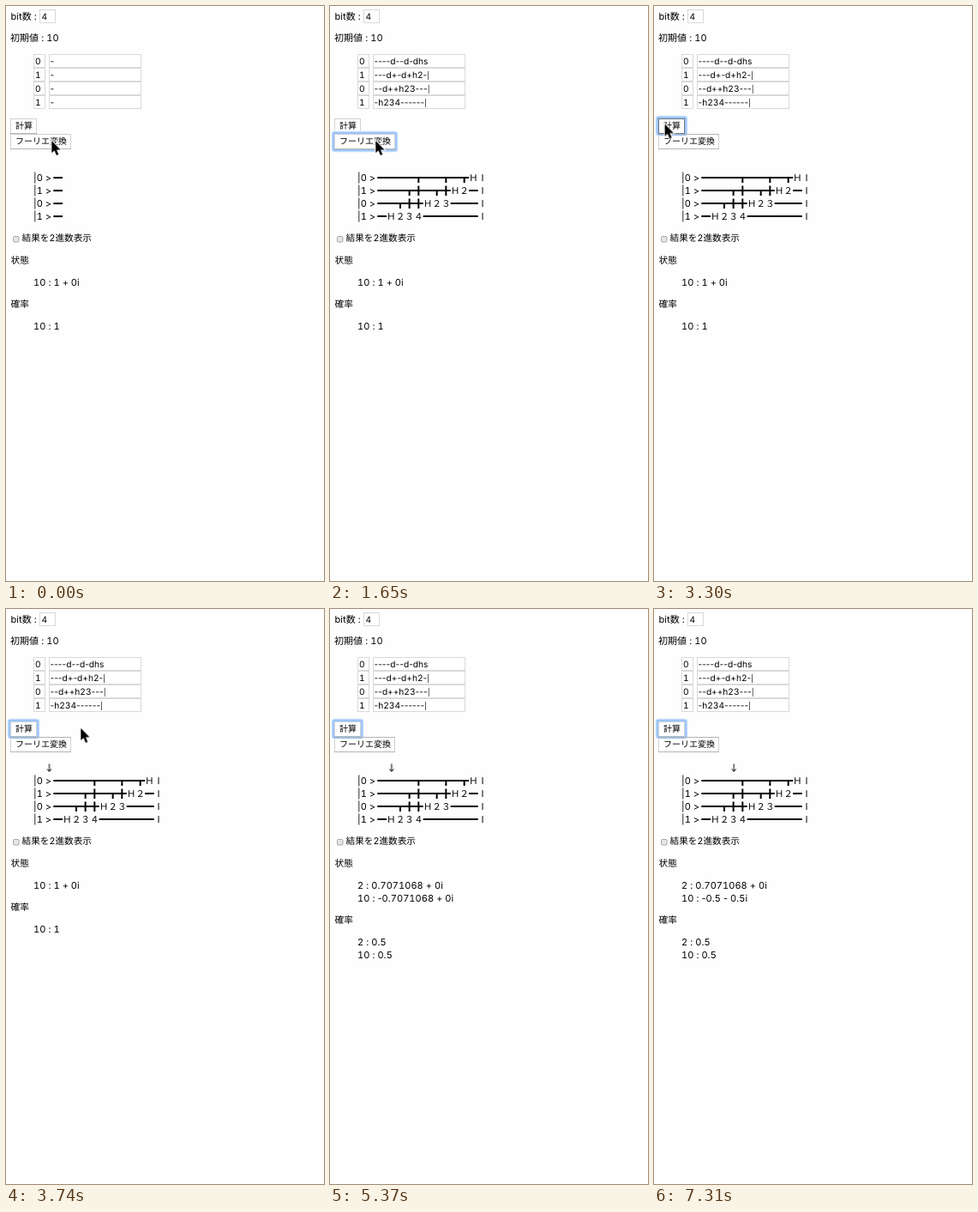
An HTML page for the animation above (8 s loop, 371 by 670 pixels).

```html
<!DOCTYPE html>
<html lang="ja">
<head>
<meta charset="utf-8">
<title>フーリエ変換</title>
<style>
html, body { margin: 0; width: 100%; height: 100%; overflow: hidden; background: #fefefe; }
svg { display: block; width: 371px; height: 670px; }
text {
  font: 11px Inter, "Noto Sans CJK JP", "Noto Sans CJK", sans-serif;
  font-feature-settings: "tnum" 1, "calt" 0;
  letter-spacing: .06px;
  text-rendering: geometricPrecision;
  white-space: pre;
}
.dash, .bar { font-feature-settings: "tnum" 0, "calt" 0; }
.bar { font-size: 8.5px; }
.ja { font-size: 10.67px; letter-spacing: 0; }
.field text { font-size: 10.2px; letter-spacing: 0; }
.btn text { font-size: 10px; letter-spacing: 0; }
.gate { text-anchor: middle; letter-spacing: 0; font-size: 10.67px; }
.box { fill: #fff; stroke: #d9d9d9; }
.face { fill: #fff; stroke: #d0d0d0; }
.edge { stroke: #b4b4b4; }
.glow { fill: none; stroke: #e3eefe; stroke-width: 1.2; }
.ring { fill: none; stroke: #9ac4fb; stroke-width: 2.4; }
.press { fill: none; stroke: #6a7280; }
.wire { stroke: #000; stroke-width: 2; fill: none; }

.anim { animation: 8s step-end infinite; }
.before { animation-name: before; }
.after { animation-name: after; }
.ring1 { animation-name: ring1; }
.press1 { animation-name: press1; }
.ring2 { animation-name: ring2; }
.press2 { animation-name: press2; }
.first { animation-name: first; }
.later { animation-name: later; }
.plus { animation-name: plus; }
.turned { animation-name: turned; }
.arrow { animation-name: arrow; }
.cursor { animation-name: cursor; }
@keyframes before { 0% { opacity: 1 } 20.625%, 100% { opacity: 0 } }
@keyframes after { 0% { opacity: 0 } 20.625%, 100% { opacity: 1 } }
@keyframes ring1 { 0% { opacity: 0 } 18.75% { opacity: 1 } 41.25%, 100% { opacity: 0 } }
@keyframes press1 { 0% { opacity: 0 } 18.75% { opacity: 1 } 20.625%, 100% { opacity: 0 } }
@keyframes ring2 { 0% { opacity: 0 } 41.25%, 100% { opacity: 1 } }
@keyframes press2 { 0% { opacity: 0 } 41.25% { opacity: 1 } 43.125%, 100% { opacity: 0 } }
@keyframes first { 0% { opacity: 1 } 67.125%, 100% { opacity: 0 } }
@keyframes later { 0% { opacity: 0 } 67.125%, 100% { opacity: 1 } }
@keyframes plus { 0% { opacity: 1 } 91.375%, 100% { opacity: 0 } }
@keyframes turned { 0% { opacity: 0 } 91.375%, 100% { opacity: 1 } }
@keyframes arrow {
  0% { opacity: 0; transform: translate(50.5px, 180px) }
  43.125% { opacity: 1; transform: translate(50.5px, 180px) }
  54.125% { opacity: 1; transform: translate(61.2px, 180px) }
  67.125% { opacity: 1; transform: translate(71.8px, 180px) }
  80.25% { opacity: 1; transform: translate(82.5px, 180px) }
  91.375%, 100% { opacity: 1; transform: translate(93.2px, 180px) }
}
@keyframes cursor {
  0% { opacity: 1; transform: translate(53.3px, 157px) }
  37.5% { opacity: 1; transform: translate(25.8px, 148px) }
  39.375% { opacity: 1; transform: translate(12.6px, 137.5px) }
  46.75% { opacity: 1; transform: translate(87.3px, 138.8px) }
  48.625%, 100% { opacity: 0; transform: translate(87.3px, 138.8px) }
}
</style>
</head>
<body>
<svg viewBox="0 0 371 670">
  <text x="5.5" y="16">bit数 : </text>
  <g class="field"><rect class="box" x="39.5" y="4.5" width="18" height="15"/><text x="41.5" y="16">4</text></g>
  <text x="5" y="41">初期値 : 10</text>

  <g id="fields" class="field"></g>

  <g class="btn">
    <rect class="face" x="5.5" y="131.5" width="30" height="17"/><path class="edge" d="M5 148.5H36"/>
    <rect class="face" x="5.5" y="149.5" width="70" height="17"/><path class="edge" d="M5 166.5H76"/>
    <g class="anim ring1">
      <rect class="glow" x="2" y="146" width="77" height="24" rx="3"/>
      <rect class="ring" x="3.7" y="147.7" width="73.6" height="20.6" rx="1.5"/>
      <rect class="press anim press1" x="5.5" y="149.5" width="70" height="17"/>
    </g>
    <g class="anim ring2">
      <rect class="glow" x="2" y="128" width="37" height="23" rx="3"/>
      <rect class="ring" x="3.7" y="129.7" width="33.6" height="20" rx="1.5"/>
      <rect class="press anim press2" x="5.5" y="131.5" width="30" height="17"/>
      <path class="edge" d="M5 149.5H76"/>
    </g>
    <text x="11" y="143">計算</text>
    <text x="11" y="161">フーリエ変換</text>
  </g>

  <g id="circuit"></g>
  <path class="anim arrow" d="M0 .4V9.2M-2.4 6.4L0 9.4L2.4 6.4" fill="none" stroke="#000"/>

  <rect x="8.5" y="268.5" width="6.5" height="6.5" rx="1" fill="#e6e6e6" stroke="#a8a8a8"/>
  <text class="ja" x="18.5" y="274">結果を2進数表示</text>

  <text class="ja" x="5.5" y="300">状態</text>
  <g class="anim first">
    <text x="32" y="326">10 : 1 + 0i</text>
    <text class="ja" x="5.5" y="351">確率</text>
    <text x="32" y="377">10 : 1</text>
  </g>
  <g class="anim later">
    <text x="32" y="326">2 : 0.7071068 + 0i</text>
    <text class="anim plus" x="32" y="341">10 : <tspan class="dash">-</tspan>0.7071068 + 0i</text>
    <text class="anim turned" x="32" y="341">10 : <tspan class="dash">-</tspan>0.5 <tspan class="dash">-</tspan> 0.5i</text>
    <text class="ja" x="5.5" y="366">確率</text>
    <text x="32" y="392">2 : 0.5</text>
    <text x="32" y="407">10 : 0.5</text>
  </g>

  <path class="anim cursor" d="M0 0V14.3L3.2 11.3L5.6 16.9L8 15.9L5.7 10.4H10.2Z"
    stroke="#fff" stroke-width="2" paint-order="stroke"/>
</svg>
<script>
const rows = ["----d--d-dhs", "---d+-d+h2-|", "--d++h23---|", "-h234------|"];
const cell = 10.67, left = 55.3;

// Wires become path segments, gates become full-width letters.
function drawRow(code, y) {
  let d = "", out = "";
  [...code].forEach((c, i) => {
    const x = left + i * cell, mid = x + cell / 2;
    if ("-d+".includes(c)) d += `M${x} ${y}h${cell + .05}`;
    if (c === "d") d += `M${mid} ${y}v5.8`;
    if (c === "+") d += `M${mid} ${y - 5.6}v11.4`;
    if (c === "|" || c === "s") out += `<path d="M${mid} ${y - 4}v8" stroke="#000"/>`;
    if (/[h\d]/.test(c)) {
      const wide = String.fromCharCode(c.toUpperCase().charCodeAt(0) + 0xFEE0);
      out += `<text class="gate" x="${mid}" y="${y + 4}">${wide}</text>`;
    }
  });
  return `<path class="wire" d="${d}"/>${out}`;
}

// Hyphens and bars keep their proportional width.
const narrow = code => code
  .replace(/-+/g, "<tspan class='dash'>$&</tspan>")
  .replace("|", "<tspan class='bar'>|</tspan>");

let fields = "", circuit = "";
rows.forEach((code, i) => {
  const y = 56.5 + 16 * i, base = y + 11.5, wire = 200.1 + 15 * i;
  fields += `<rect class="box" x="32.5" y="${y}" width="13" height="15"/>
    <rect class="box" x="50.5" y="${y}" width="107" height="15"/>
    <text x="34" y="${base}">${i % 2}</text>
    <text class="anim before" x="51.5" y="${base}">${narrow("-")}</text>
    <text class="anim after" x="51.5" y="${base}">${narrow(code)}</text>`;
  circuit += `<text x="32" y="${wire + 4}">|${i % 2} &gt;</text>
    <g class="anim before">${drawRow("-", wire)}</g>
    <g class="anim after">${drawRow(code, wire)}</g>`;
});
document.getElementById("fields").innerHTML = fields;
document.getElementById("circuit").innerHTML = circuit;
</script>
</body>
</html>
```
